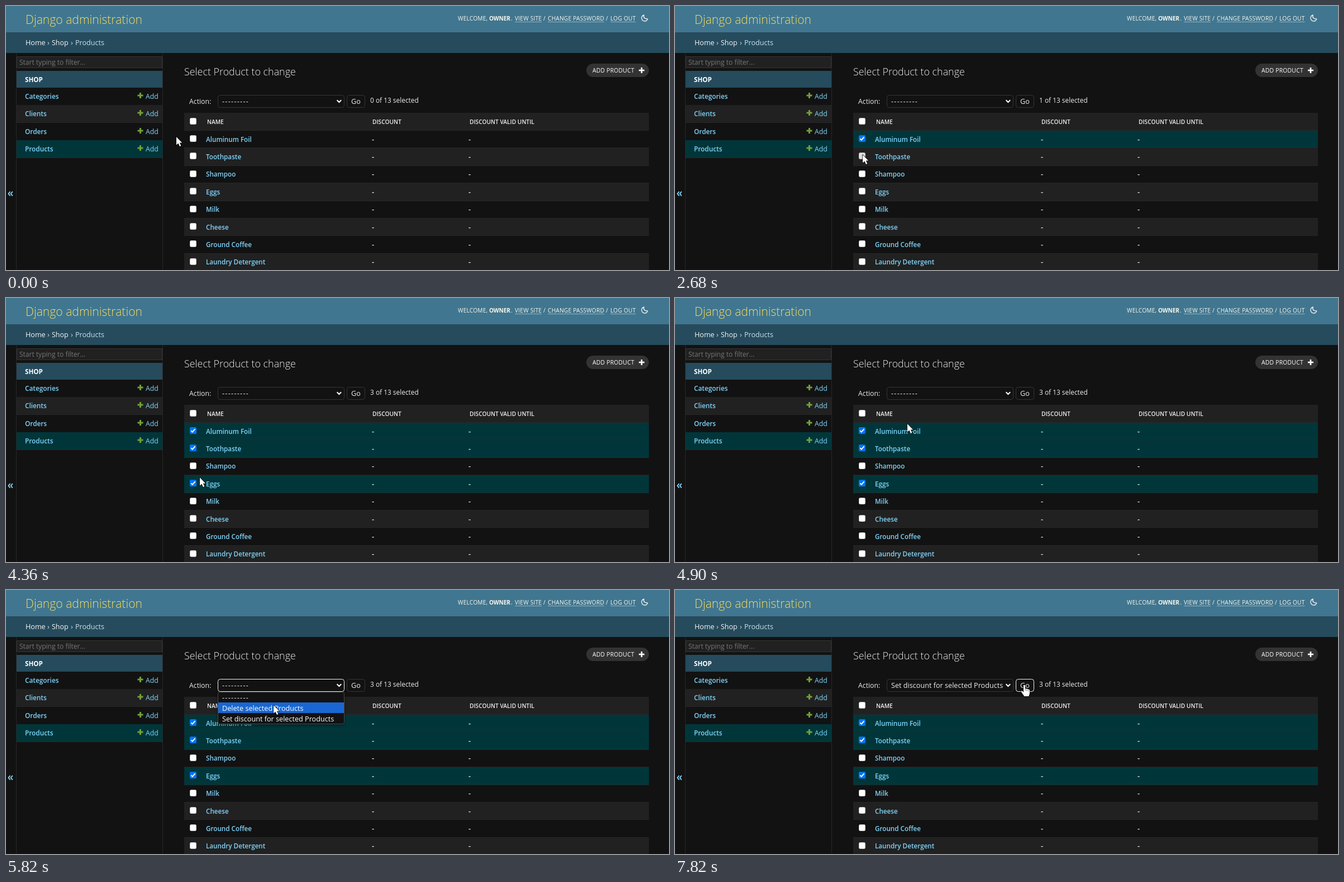
These frames come from a looping animation (1187x472 px, 8 s). An HTML page with a canvas:

```html
<!DOCTYPE html>
<html lang="en">
<head>
<meta charset="utf-8">
<title>Product list</title>
<style>
html, body { margin: 0; width: 100%; height: 100%; overflow: hidden; background: #121212; }
canvas { display: block; }
</style>
</head>
<body>
<canvas id="stage" width="1187" height="472"></canvas>
<script>
const ctx = document.getElementById('stage').getContext('2d');
const LOOP = 8000;
const FONT = '"Open Sans", "Noto Sans", sans-serif';
const C = {
  bg: '#121212', dark: '#212121', line: '#272727', border: '#353535', primary: '#264b5d',
  header: '#417690', accent: '#f5dd5d', link: '#81d4fa', fg: '#eeeeee', row: '#00363a',
  user: '#f8f8ec'
};
const PRODUCTS = ['Aluminum Foil', 'Toothpaste', 'Shampoo', 'Eggs', 'Milk', 'Cheese',
  'Ground Coffee', 'Laundry Detergent'];
const PITCH = 31.4;

// Row index, press time, time at which it becomes checked
const CHECKS = [[0, 1610, 1750], [1, 2680, 2820], [3, 3950, 4080]];
const FOCUS = 5100, OPEN = 5290, CHOSEN = 6220, GO = 7030;

// Start, end, steps, control point, end point
const START = [305, 234];
const MOVES = [
  [720, 1210, 8, 318, 234, 330, 237],
  [1350, 1410, 2, 332, 237, 334, 238],
  [1820, 2210, 6, 337, 245, 338, 259],
  [2350, 2480, 2, 337, 263, 336, 266],
  [2890, 3480, 9, 338, 292, 338, 325],
  [3680, 3750, 2, 336, 328, 335, 331],
  [4360, 5100, 11, 403, 278, 437, 171],
  [5290, 6020, 11, 423, 184, 527, 228],
  [6360, 7030, 11, 517, 178, 624, 169],
  [7820, 7820, 1, 625, 170, 626, 170]
];

function cursorAt(t) {
  let [x, y] = START;
  for (const [t0, t1, n, cx, cy, ex, ey] of MOVES) {
    if (t < t0) break;
    const gap = n > 1 ? (t1 - t0) / (n - 1) : 1;
    const p = Math.min(n, Math.floor((t - t0) / gap + 0.15) + 1) / n, q = 1 - p;
    x = q * q * x + 2 * p * q * cx + p * p * ex;
    y = q * q * y + 2 * p * q * cy + p * p * ey;
  }
  return [Math.round(x), Math.round(y)];
}

function rect(x, y, w, h, color) {
  ctx.fillStyle = color;
  ctx.fillRect(x, y, w, h);
}

function box(x, y, w, h, r, fill, stroke, width = 1) {
  ctx.beginPath();
  ctx.roundRect(x, y, w, h, r);
  if (fill) { ctx.fillStyle = fill; ctx.fill(); }
  if (stroke) { ctx.strokeStyle = stroke; ctx.lineWidth = width; ctx.stroke(); }
}

function text(str, x, y, size, color = C.fg, weight = 400, gap = 0) {
  ctx.font = `${weight} ${size}px ${FONT}`;
  ctx.letterSpacing = gap + 'px';
  ctx.fillStyle = color;
  ctx.fillText(str, x, y);
  return ctx.measureText(str).width;
}

function path(points, color, width) {
  ctx.beginPath();
  points.forEach(([x, y], i) => i ? ctx.lineTo(x, y) : ctx.moveTo(x, y));
  ctx.strokeStyle = color;
  ctx.lineWidth = width;
  ctx.stroke();
}

function plus(cx, cy, r, w, color) {
  rect(cx - r, cy - w / 2, 2 * r, w, color);
  rect(cx - w / 2, cy - r, w, 2 * r, color);
}

function userText(str, x, weight = 400) {
  return text(str, x, 26, 10.2, C.user, weight, weight > 400 ? -0.15 : 0.2);
}

function userLink(str, x) {
  rect(x, 28, userText(str, x), 1, 'rgba(255,255,255,.45)');
}

function drawHeader() {
  rect(0, 0, 1187, 47, C.header);
  rect(0, 47, 1187, 37, C.primary);
  text('Django administration', 35, 32, 21.1, C.accent, 300);
  userText('WELCOME,', 809);
  userText('OWNER', 865, 700);
  userText('.', 904);
  userLink('VIEW SITE', 911);
  userText('/', 962);
  userLink('CHANGE PASSWORD', 970);
  userText('/', 1074);
  userLink('LOG OUT', 1082);
  ctx.beginPath();
  ctx.arc(1143.5, 21.5, 5.6, 0.25, 4.45);
  ctx.quadraticCurveTo(1140.5, 23.5, 1148.9, 22.9);
  ctx.strokeStyle = '#f7f7f7';
  ctx.lineWidth = 1.3;
  ctx.stroke();
  text('Home', 35, 70, 12.6, '#f7f7f7');
  text('›', 74, 70, 12.6, '#c9e3ee');
  text('Shop', 82, 70, 12.4, '#f7f7f7');
  text('›', 116, 70, 12.6, '#c9e3ee');
  text('Products', 124, 70, 12.6, '#c9e3ee');
}

function drawSidebar() {
  rect(18, 84, 1, 388, C.line);
  rect(280, 84, 1, 388, C.line);
  box(19.5, 90.5, 260, 20, 0, C.dark, C.border);
  text('Start typing to filter...', 24, 105, 12.05, '#777777');
  rect(19, 116, 261, 30, C.primary);
  text('SHOP', 34, 136, 11.6, '#ffffff', 700);
  ['Categories', 'Clients', 'Orders', 'Products'].forEach((name, i) => {
    const y = Math.round(146 + i * PITCH);
    rect(19, y, 261, 31, [C.bg, C.dark, C.bg, C.row][i]);
    rect(19, y + 31, 261, 1, C.line);
    text(name, 34, y + 20, 11.8, C.link, 600);
    plus(240.5, y + 14, 5, 3, '#70a038');
    text('Add', 250, y + 20, 12.3, C.link);
  });
  text('«', 2.5, 341, 19.5, C.link, 600);
}

function checkbox(x, y, on, pressed) {
  if (!on) return box(x + .5, y + .5, 11, 11, 2, pressed ? '#e0e0e0' : '#ffffff', '#c4c4c4');
  box(x, y, 12, 12, 2, '#0075ff');
  path([[x + 2.4, y + 6.2], [x + 4.8, y + 8.7], [x + 9.6, y + 3.2]], '#ffffff', 1.9);
}

function drawTable(t, hoverName) {
  rect(319, 191, 832, 32, C.dark);
  if (hoverName) rect(350, 191, 296, 31, '#1b1b1b');
  rect(319, 222, 832, 1, C.line);
  checkbox(329, 200, false);
  text('NAME', 360, 211, 10.2, C.fg, 600);
  text('DISCOUNT', 656, 211, 10.2, C.fg, 600);
  text('DISCOUNT VALID UNTIL', 830, 211, 10.2, C.fg, 600);
  PRODUCTS.forEach((name, i) => {
    const y = Math.round(222.9 + i * PITCH), end = Math.round(222.9 + (i + 1) * PITCH);
    const base = Math.round(242.6 + i * PITCH);
    const check = CHECKS.find(c => c[0] === i);
    const on = check && t >= check[2];
    rect(319, y, 832, end - y, on ? C.row : i % 2 ? C.dark : C.bg);
    rect(319, end - 1, 832, 1, C.line);
    checkbox(329, Math.round(230.9 + i * PITCH), on, check && t >= check[1]);
    text(name, 358, base, 11.7, C.link, 600);
    text('-', 655, base, 13, C.fg, 600);
    text('-', 828, base, 13, C.fg, 600);
  });
}

function drawActions(t) {
  text('Select Product to change', 319, 124, 17.9, C.fg, 300);
  box(1039, 103, 112, 24, 12, '#333333');
  text('ADD PRODUCT', 1050, 119, 10.4, '#ffffff', 400, 0.2);
  plus(1138, 115, 5, 2.6, '#ffffff');

  const focus = t >= FOCUS && t < GO, ring = focus && t >= CHOSEN;
  text('Action:', 328, 175, 12.3);
  if (ring) box(379, 159, 227, 23, 4, C.bg, '#ffffff', 2);
  else box(379.5, 159.5, 226, 22, 4, C.bg, focus ? '#f4f4f4' : C.border);
  if (t < CHOSEN) text('---------', 387, 175, 12.6, C.fg, 400, 1.3);
  else text('Set discount for selected Products', 387, 175, 12.65);
  path([[592.6, 168.2], [596.4, 172], [600.2, 168.2]], '#ffffff', 2);

  box(610.5, 159.5, 32, 22, 4, C.bg, t >= GO ? '#f4f4f4' : C.border);
  text('Go', 618, 175, 12.65);
  const count = CHECKS.filter(c => t >= c[2]).length;
  text(count + ' of 13 selected', 652, 173, 11.9);
}

function drawMenu(y) {
  ctx.save();
  ctx.shadowColor = 'rgba(0,0,0,.5)';
  ctx.shadowBlur = 5;
  ctx.shadowOffsetY = 2;
  box(379.5, 182.5, 226, 57, 4, C.bg);
  ctx.restore();
  const pick = Math.max(0, Math.min(2, Math.floor((y - 182) / 19)));
  rect(380, 182 + pick * 19, 225, 19, '#1967d2');
  box(379.5, 182.5, 226, 57, 3, null, '#4a4a4a');
  text('---------', 387, 197, 12.6, C.fg, 400, 1.3);
  text('Delete selected Products', 387, 216, 12.65, '#ffffff');
  text('Set discount for selected Products', 387, 235, 12.65, '#ffffff');
}

const ARROW = new Path2D('M0 0V14.5L3.4 11.4L6 17L8.4 16L5.9 10.5H10.3Z');
const HAND = new Path2D('M-2 1.2C-2-.7 1-.7 1 1.2V7C1.4 5.8 3.8 6 3.9 7.4C4.6 6.4 6.5 6.8 6.6 8.2' +
  'C7.6 7.4 9 8 9 9.6V14C9 16.3 8 17 7.5 20H-1C-1.6 17.6-4.2 15.3-6 12.2C-7 10.3-4.8 9.5-3.6 11L-2 13Z');

function drawCursor(x, y, hand) {
  ctx.save();
  ctx.translate(x, y);
  const shape = hand ? HAND : ARROW;
  ctx.lineJoin = 'round';
  ctx.strokeStyle = '#000000';
  ctx.lineWidth = 1.4;
  ctx.stroke(shape);
  ctx.fillStyle = '#ffffff';
  ctx.fill(shape);
  if (hand) {
    path([[1.2, 7], [1.2, 10]], '#222222', .7);
    path([[4, 8], [4, 10.5]], '#222222', .7);
    path([[6.7, 9], [6.7, 11]], '#222222', .7);
  }
  ctx.restore();
}

function draw(t) {
  const [x, y] = cursorAt(t);
  const closed = t >= CHOSEN;
  const overName = closed && x < 646 && y >= 191 && y < 223;
  const overGo = x >= 610 && x < 643 && y >= 159 && y < 182;
  rect(0, 0, 1187, 472, C.bg);
  drawHeader();
  drawSidebar();
  drawTable(t, overName);
  drawActions(t);
  if (t >= OPEN && !closed) drawMenu(y);
  drawCursor(x, y, overName || overGo);
}

const begin = performance.now();
function tick() {
  draw((performance.now() - begin) % LOOP);
  requestAnimationFrame(tick);
}
tick();
</script>
</body>
</html>
```
